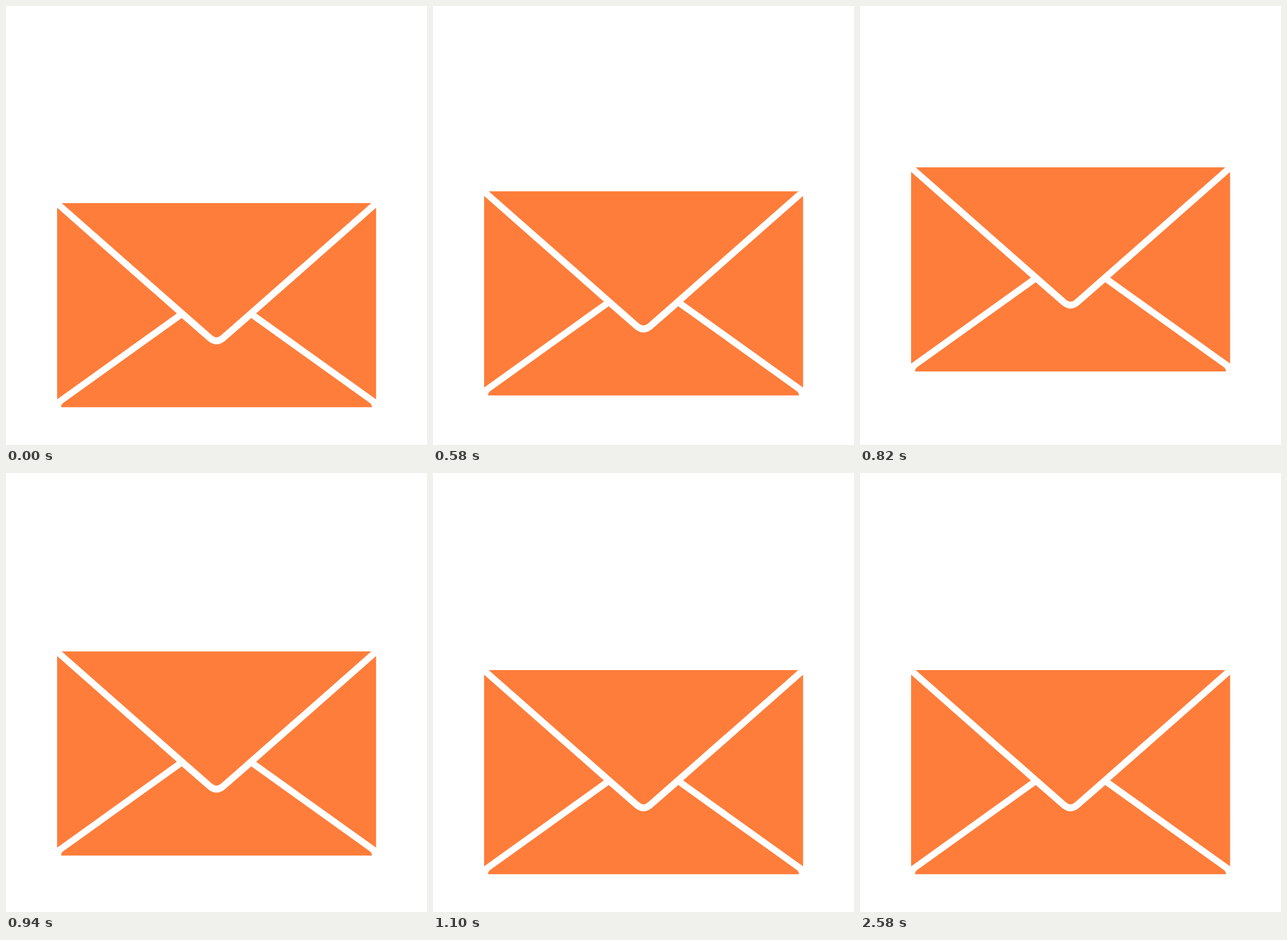
An HTML page that plays this animation: 733x764 px, repeating every 7820 ms.

```html
<!DOCTYPE html>
<html lang="en">
<head>
<meta charset="utf-8">
<title>Envelope</title>
<style>
  html, body { margin: 0; width: 100%; height: 100%; overflow: hidden; background: #fff; }
  svg { display: block; width: 100%; height: 100%; fill: #ff7d3a; }
</style>
</head>
<body>
<svg viewBox="0 0 733 764">
  <g id="closed">
    <path d="M97 343H636L374.5 573.1Q366.5 580.2 358.5 573.1Z"/>
    <path d="M89 351L297.5 535L89 684.5Z"/>
    <path d="M644.4 351L435.5 535L644.4 684.5Z"/>
    <path d="M96 698.2Q95.5 694 100 690.5L306 543L352 583Q366.5 594.5 381 583L427 543L633 690.5Q637.5 694 637 698.2Z"/>
  </g>
  <g id="open">
    <path d="M353 72L99 296A20 20 0 0 0 112 331.5H621A20 20 0 0 0 634 296L380 72Q366.5 61.5 353 72Z"/>
    <path d="M84.5 343.5L334.5 503.5L95 675Q87 681 85.5 687H84.5Z"/>
    <path d="M648.5 344.5L399 503.5L638 675Q646 681 647.5 687H648.5Z"/>
    <path d="M360 499Q366.5 493.5 373 499L633 685Q637 688 637 692Q636 697.5 633 698H100Q97 697.5 96 692Q96 688 100 685Z"/>
  </g>
</svg>
<script>
const LOOP = 7820, STEP = 40, HOP_START = 460, HALF = 8, HEIGHT = 65;
const OPEN_AT = 1300, CLOSE_AT = 2580;
const closed = document.getElementById('closed');
const open = document.getElementById('open');

const ease = u => u * u * (3 - 2 * u);

// The hop advances in 40 ms steps: eight up, eight down.
function lift(t) {
  const k = Math.floor((t - HOP_START) / STEP);
  if (k <= 0 || k >= 2 * HALF) return 0;
  return HEIGHT * ease(1 - Math.abs(k - HALF) / HALF);
}

function draw(t) {
  const isOpen = t >= OPEN_AT && t < CLOSE_AT;
  open.style.display = isOpen ? '' : 'none';
  closed.style.display = isOpen ? 'none' : '';
  closed.setAttribute('transform', `translate(0 ${-lift(t)})`);
}

const start = performance.now();
function tick() {
  draw((performance.now() - start) % LOOP);
  requestAnimationFrame(tick);
}
tick();
</script>
</body>
</html>
```
